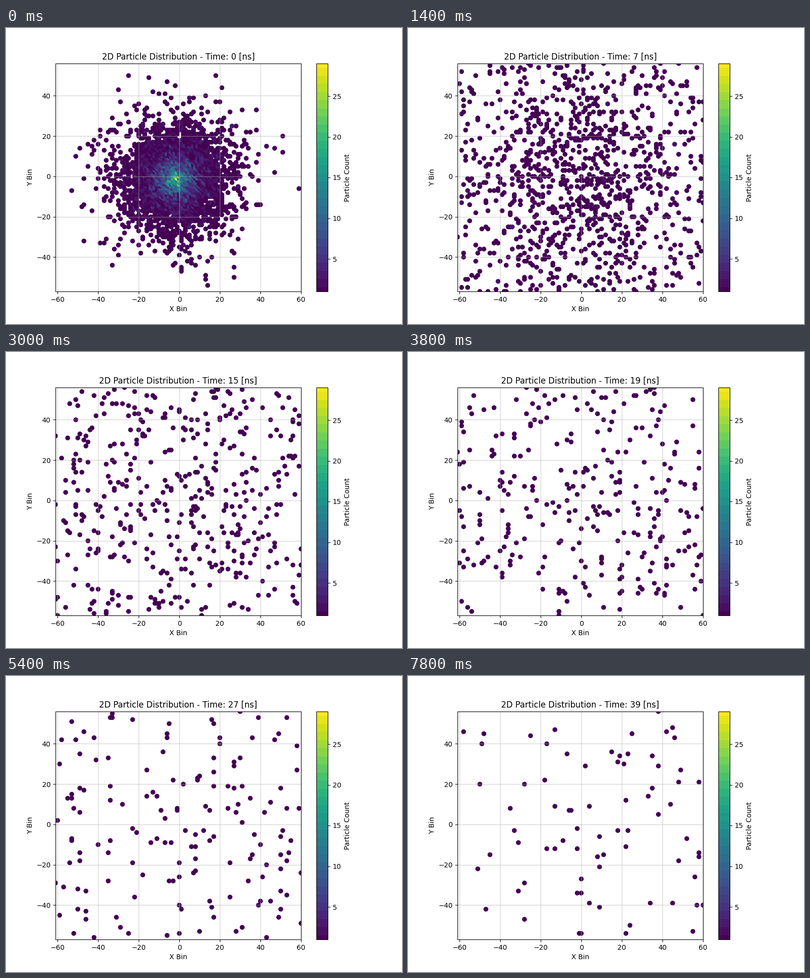
These frames come from a looping animation (800x600 px, 8 s). A matplotlib script:

```python
import numpy as np
import matplotlib.pyplot as plt
from matplotlib.animation import FuncAnimation
from matplotlib.colors import ListedColormap

FRAMES, STEP_MS = 40, 200
X_LIM, Y_LIM = (-61, 60), (-57, 56)
MAX_COUNT = 29
N = 5600
CORE_SIZE = 6.4      # bins
CORE_SPEED = 5.5     # bins per ns
TAIL = 0.15          # smaller means more fast particles

rng = np.random.default_rng(12)


def scatter_round(radius):
    """Points at the given radii in random directions."""
    angle = rng.uniform(0, 2 * np.pi, len(radius))
    return np.column_stack([radius * np.cos(angle), radius * np.sin(angle)])


# Exponential core that flies apart at constant, heavy-tailed speeds
start = scatter_round(rng.gamma(2, CORE_SIZE, N)) + (-1, -1)
u = rng.uniform(0.05, 1, N)
velocity = scatter_round(CORE_SPEED * np.sqrt(u ** (-1 / TAIL) - 1))


def count_bins(t):
    bins = np.round(start + velocity * t)
    x, y = bins.T
    inside = ((x >= X_LIM[0]) & (x <= X_LIM[1])
              & (y >= Y_LIM[0]) & (y <= Y_LIM[1]))
    return np.unique(bins[inside], axis=0, return_counts=True)


# One colour per whole count, each band centred on its value
halves = 1 + (np.arange(2 * (MAX_COUNT - 1)) + 0.5) / 2
cmap = ListedColormap(
    plt.get_cmap("viridis")((np.round(halves) - 1) / (MAX_COUNT - 1)))

fig, ax = plt.subplots(figsize=(8, 6), dpi=100)
dots = ax.scatter([0], [0], c=[1], cmap=cmap, vmin=1, vmax=MAX_COUNT)
fig.colorbar(dots, ax=ax, label="Particle Count")
ax.set(xlim=X_LIM, ylim=Y_LIM, xlabel="X Bin", ylabel="Y Bin")
ax.grid(True, alpha=0.6)
title = ax.set_title("")


def update(t):
    bins, counts = count_bins(t)
    dots.set_offsets(bins)
    dots.set_array(counts)
    title.set_text(f"2D Particle Distribution - Time: {t} [ns]")
    return dots, title


def reset():
    return update(0)


anim = FuncAnimation(fig, update, frames=FRAMES, init_func=reset,
                     interval=STEP_MS, repeat=True, repeat_delay=0)
plt.show()
```
